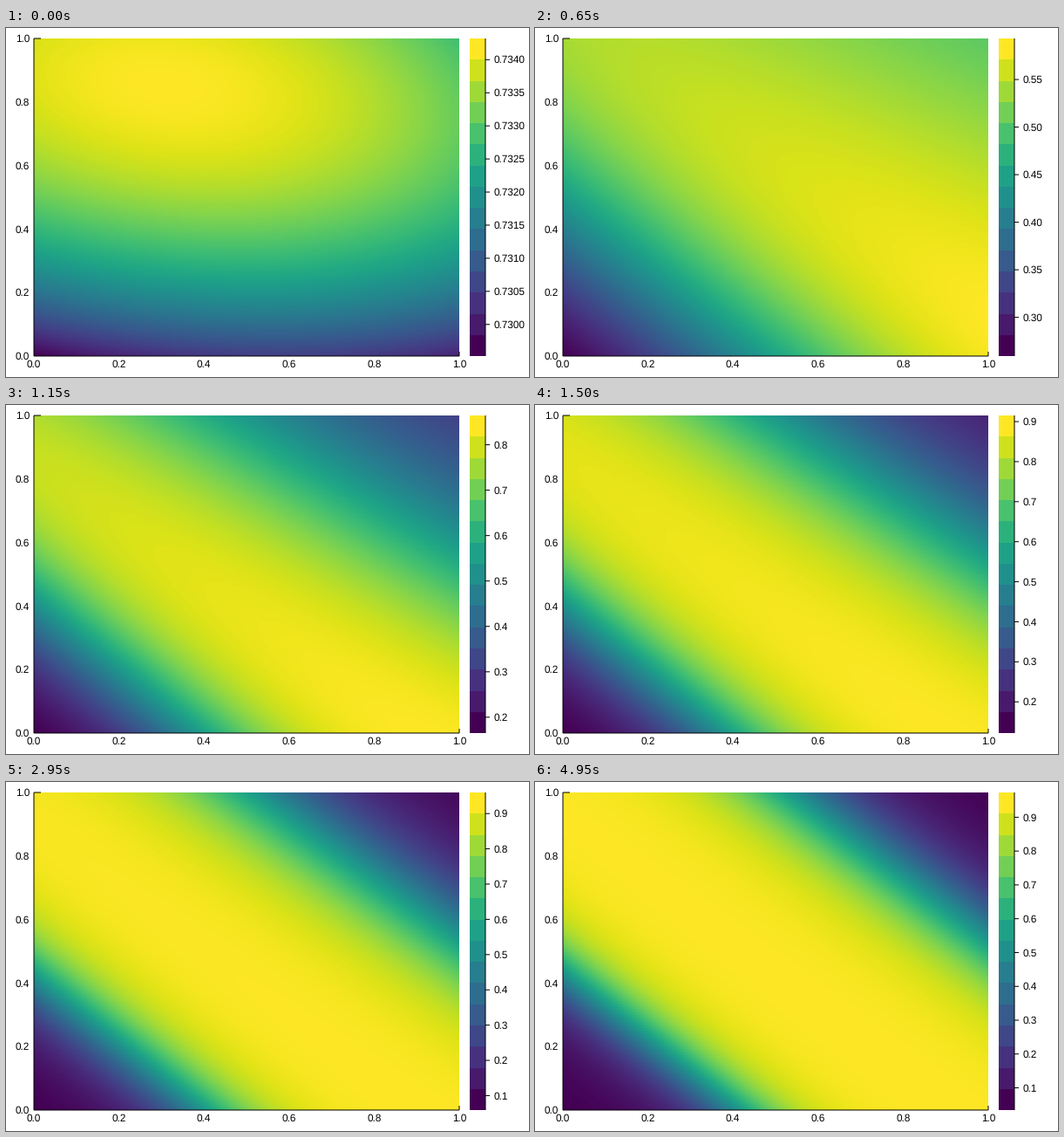
These frames come from a looping animation (600 by 400 pixels, 5000 ms). A matplotlib script:

```python
import math

import numpy as np
import matplotlib.pyplot as plt
from matplotlib.animation import FuncAnimation

W, H, DPI = 600, 400, 100
FRAMES, INTERVAL = 100, 50
LEFT, RIGHT, TOP, BOTTOM = 32, 520, 12, 376
BAR_L, BAR_R, BANDS = 532, 550, 15
CELLS = 244
PX = 72 / DPI

plt.rcParams["font.family"] = "Liberation Sans"
plt.rcParams["font.size"] = 8.5
plt.rcParams["text.hinting"] = "none"

# A network with two hidden units learns XOR. Each stage holds
# (x weight, y weight, bias) per unit, then output weights and bias.
WAKE, SPLIT = 8, 18
WOKEN = np.array([2, 2.5, -0.8, 0.6, 0.9, -1.3, 1.67, -0.52, -1.21])
DIVIDED = np.array([5, 4.6, -1.75, 2.2, 3.3, -3.6, 3.05, -1.75, -1.74])
TRAINED = np.array([6.6, 6.3, -2.8, 4.4, 4.4, -6.75, 8.23, -8.56, -3.8])
START_BIAS, START_SPAN = 0.9922, 0.0242


def mix(a, b, s):
    return a + (b - a) * s


def weights_at(t):
    """Network weights and the share left of the untrained surface."""
    if t < WAKE:
        s = t / WAKE
        w = WOKEN.copy()
        w[6:8] *= s * s
        w[8] = mix(START_BIAS, WOKEN[8], s)
        return w, 1 - s
    if t < SPLIT:
        return mix(WOKEN, DIVIDED, (t - WAKE) / (SPLIT - WAKE)), 0
    # Training slows down logarithmically; the output bias lags behind.
    s = math.log1p((t - SPLIT) / 2.5) / math.log1p((FRAMES - 1 - SPLIT) / 2.5)
    w = mix(DIVIDED, TRAINED, s)
    w[8] = mix(DIVIDED[8], TRAINED[8], s**1.5)
    return w, 0


def sigmoid(v):
    return 1 / (1 + np.exp(-v))


X, Y = np.meshgrid(np.linspace(0, 1, CELLS), np.linspace(0, 1, CELLS))
UNTRAINED = START_SPAN * (
    0.62 * X - 0.52 * X**2 + 2.15 * Y - 1.2 * Y**2 - 0.35 * X * Y)


def field(t):
    (ax1, ay1, b1, ax2, ay2, b2, out1, out2, bias), left = weights_at(t)
    h1 = sigmoid(ax1 * X + ay1 * Y + b1)
    h2 = sigmoid(ax2 * X + ay2 * Y + b2)
    return sigmoid(out1 * h1 + out2 * h2 + bias + left * UNTRAINED)


def bar_ticks(lo, hi):
    """Tick values and the number of decimals for the colour bar."""
    n = math.floor(math.log10(hi - lo))
    factor = (hi - lo) / 10**n
    if factor > 5:
        step, extra = 1, 0
    elif factor > 2.5:
        step, extra = 0.5, 1
    else:
        step, extra = 0.25, 2
    step *= 10.0**n
    first, last = math.ceil(lo / step), math.floor(hi / step)
    return [k * step for k in range(first, last + 1)], extra - n


fig = plt.figure(figsize=(W / DPI, H / DPI), dpi=DPI, facecolor="white")
ax = fig.add_axes([0, 0, 1, 1])
ax.axis("off")


def image(data, x0, x1):
    return ax.imshow(data, cmap="viridis", origin="lower", aspect="auto",
                     interpolation="nearest", extent=(x0, x1, BOTTOM, TOP))


heat = image(field(0), LEFT, RIGHT)
image(np.arange(BANDS)[:, None], BAR_L, BAR_R)
ax.set_xlim(0, W)
ax.set_ylim(H, 0)


def line(xs, ys):
    return ax.plot(xs, ys, color="black", lw=PX, snap=False,
                   solid_capstyle="butt")[0]


def label(x, y, text, ha):
    return ax.text(x, y + 4, text, ha=ha, va="baseline", color="black")


line([LEFT, LEFT], [TOP, BOTTOM])
line([LEFT, RIGHT], [BOTTOM, BOTTOM])
line([LEFT, LEFT + 8], [TOP, TOP])
line([RIGHT, RIGHT], [BOTTOM - 5, BOTTOM])
line([BAR_R, BAR_R], [TOP, BOTTOM])

for k in range(6):
    v = k / 5
    label(mix(LEFT, RIGHT, v), 385, f"{v:.1f}", "center")
    label(27, mix(BOTTOM, TOP, v), f"{v:.1f}", "right")

ticks = [(line([BAR_R, BAR_R + 5], [0, 0]), label(559.5, 0, "", "left"))
         for _ in range(12)]


def update(frame):
    z = field(frame)
    lo, hi = z.min(), z.max()
    heat.set_data(z)
    heat.set_clim(lo, hi)
    values, digits = bar_ticks(lo, hi)
    for i, (mark, text) in enumerate(ticks):
        shown = i < len(values)
        mark.set_visible(shown)
        text.set_visible(shown)
        if shown:
            y = mix(BOTTOM, TOP, (values[i] - lo) / (hi - lo))
            mark.set_ydata([y, y])
            text.set_y(y + 4)
            text.set_text(f"{values[i]:.{digits}f}")
    return []


anim = FuncAnimation(fig, update, frames=FRAMES, interval=INTERVAL,
                     repeat=True, repeat_delay=0, blit=False)
plt.show()
```
